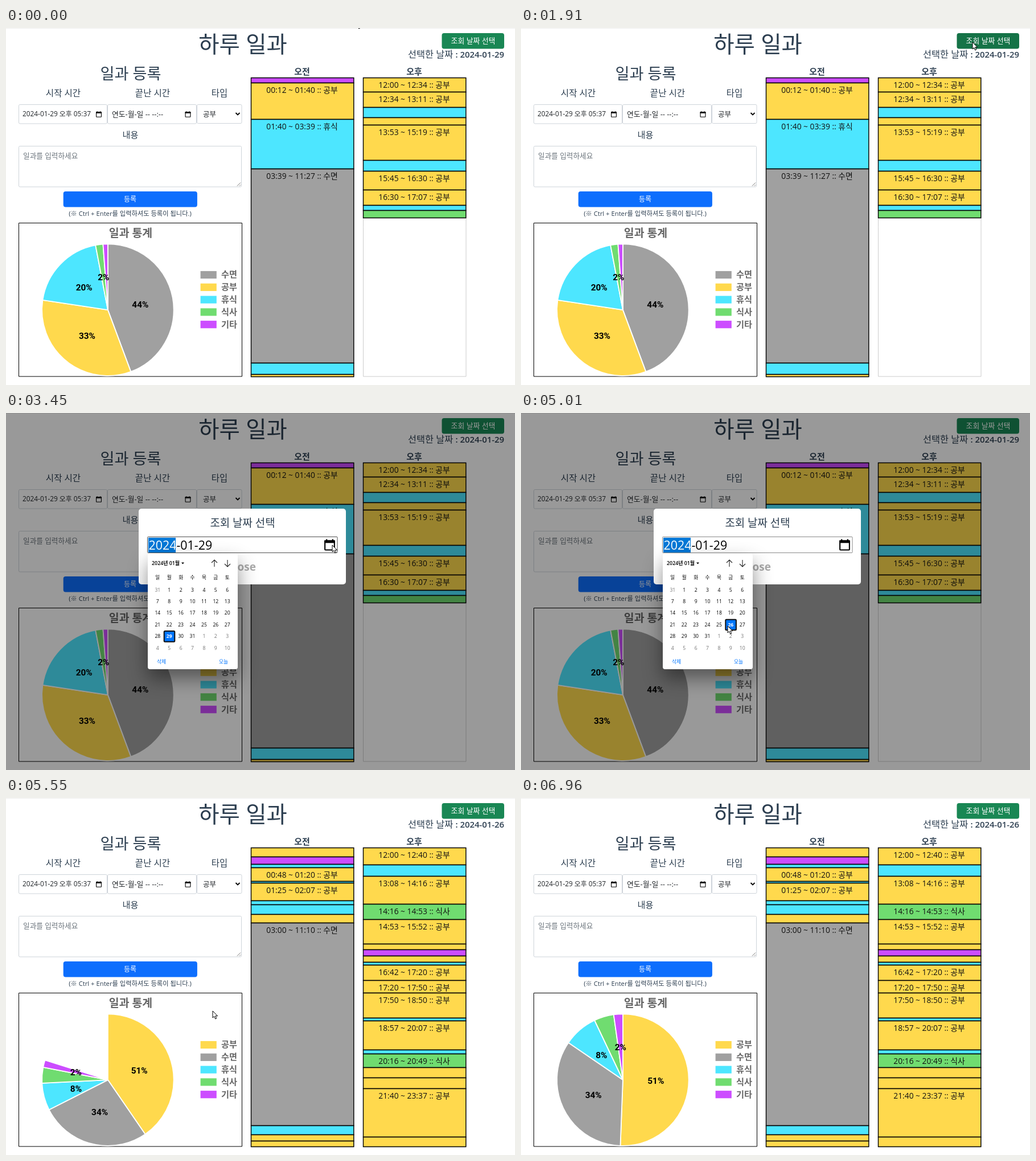
Recreate the animation shown at these times as an HTML page with a canvas. Size 894 by 627 pixels, loop 7810 ms.

```html
<!DOCTYPE html>
<html lang="ko">
<head>
<meta charset="utf-8">
<title>하루 일과</title>
<style>
html, body { margin: 0; height: 100%; overflow: hidden; background: #fff; }
canvas { display: block; }
</style>
</head>
<body>
<canvas id="stage" width="894" height="627"></canvas>
<script>
const ctx = document.getElementById('stage').getContext('2d');
const LOOP = 7810, OPEN = 1980, PICK = 3300, CHOOSE = 5010, CLOSE = 5221;
const INK = '#2c3e50', SANS = '"Open Sans", "Noto Sans CJK KR", sans-serif';
const TYPES = {
  S: ['수면', '#a0a0a0'], W: ['공부', '#ffd94d'], R: ['휴식', '#4de6ff'],
  M: ['식사', '#70dc70'], E: ['기타', '#cc4dff']
};

// Each column: type letters and the minute at which each block ends.
// Pie: slice order, end angles in degrees, and the slice without a label.
const DAYS = [{
  date: '2024-01-29',
  am: ['EWRSRW', [12, 100, 219, 687, 715, 720]],
  pm: ['WWRWWRWWRM', [34, 71, 96, 113, 199, 225, 270, 307, 319, 337]],
  pie: ['SWRME', [159.6, 278.5, 349.2, 355.8, 360], 4]
}, {
  date: '2024-01-26',
  am: ['WERWRWRRWSRWW', [22, 39, 48, 80, 85, 127, 137, 160, 180, 670, 691, 706, 720]],
  pm: ['WRWMWWEWRWWWRWRMWWWW', [40, 68, 136, 173, 232, 245, 260, 275, 282, 320, 350,
    410, 417, 487, 496, 529, 554, 580, 697, 720]],
  pie: ['WSRME', [182.2, 304.4, 334.6, 352, 360], 3]
}];

// Pointer path: time, x, y of the tip.
const PATH = [[0, 615, -13], [300, 615, -13], [850, 715, 38], [1120, 743, 31], [1510, 793, 25],
  [2230, 793, 25], [3110, 573, 232], [3600, 573, 232], [4380, 352, 391], [4610, 363, 374],
  [5960, 363, 374], [6800, 468, 612], [6960, 512, 645], [LOOP, 512, 645]];

function pointer(t) {
  const i = PATH.findIndex(p => p[0] > t), [t0, x0, y0] = PATH[i - 1], [t1, x1, y1] = PATH[i];
  const u = (t - t0) / (t1 - t0), e = u * u * (3 - 2 * u);
  return [x0 + (x1 - x0) * e, y0 + (y1 - y0) * e];
}

const inside = ([px, py], x, y, w, h) => px >= x && px < x + w && py >= y && py < y + h;

// y is the visual middle of the line.
function text(s, x, y, size, color = INK, weight = 400, align = 'center', font = SANS) {
  ctx.font = `${weight} ${size}px ${font}`;
  ctx.textAlign = align;
  ctx.fillStyle = color;
  ctx.fillText(s, x, y + size * .37);
}

function box(x, y, w, h, fill, stroke, r = 0, line = 1) {
  ctx.beginPath();
  ctx.roundRect(x, y, w, h, r);
  if (fill) { ctx.fillStyle = fill; ctx.fill(); }
  if (stroke) { ctx.strokeStyle = stroke; ctx.lineWidth = line; ctx.stroke(); }
}

function lines(width, color, ...paths) {
  ctx.lineWidth = width;
  ctx.strokeStyle = color;
  ctx.beginPath();
  for (const p of paths)
    for (let i = 0; i < p.length; i += 2) ctx[i ? 'lineTo' : 'moveTo'](p[i], p[i + 1]);
  ctx.stroke();
}

function calendarIcon(x, y, s) {
  ctx.save();
  ctx.translate(x, y);
  ctx.scale(s, s);
  box(-4.4, -3.7, 8.8, 8.4, null, '#000', .5, 1.1);
  ctx.fillStyle = '#000';
  ctx.fillRect(-4.9, -4.2, 9.8, 2.5);
  ctx.fillRect(-3.4, -5.2, 1.2, 1.5);
  ctx.fillRect(2.2, -5.2, 1.2, 1.5);
  ctx.restore();
}

function form() {
  text('하루 일과', 416, 28, 39.5, INK, 300);
  text('일과 등록', 219, 80, 27.2, INK, 300);
  text('시작 시간', 100.5, 114, 15.6, INK, 300);
  text('끝난 시간', 257.5, 114, 15.6, INK, 300);
  text('타입', 375, 114, 15.4, INK, 300);
  text('내용', 218.5, 187, 15.2, INK, 300);

  const edge = '#ced4da', dark = '#212529';
  box(22.5, 134.5, 155, 33.5, '#fff', edge, 2);
  box(178.5, 134.5, 156, 33.5, '#fff', edge, 2);
  box(335.5, 134.5, 78.5, 33, '#fff', edge, 2);
  text('2024-01-29 오후 05:37', 29, 151, 11.85, dark, 400, 'left');
  text('연도-월-일 -- --:--', 186, 151, 12.8, dark, 400, 'left');
  text('공부', 346, 151, 12.5, dark, 400, 'left');
  calendarIcon(163, 151.5, 1);
  calendarIcon(319.5, 151.5, 1);
  lines(1.8, '#000', [403.5, 149, 407, 152.5, 410.5, 149]);

  box(22.5, 207.5, 391, 71.5, '#fff', edge, 2);
  text('일과를 입력하세요', 30, 224, 12.65, '#6c757d', 400, 'left');
  lines(1, '#777', [406, 277.5, 412, 271.5], [410, 277.5, 412, 275.5]);
  box(100.7, 287, 235.2, 27.4, '#0d6efd', null, 4);
  text('등록', 218, 300.5, 12, '#fff');
  text('(※ Ctrl + Enter를 입력하셔도 등록이 됩니다.)', 218, 326, 11.25);
}

function column(x, [types, ends], hour) {
  const yOf = m => Math.round(87.4 + m * 524.4 / 720) + .5;
  const clock = m => [hour + Math.floor(m / 60), m % 60].map(n => String(n).padStart(2, '0')).join(':');
  box(x + .5, 87.5, 180.5, 524.5, null, '#ccc');
  let start = 0;
  ends.forEach((end, i) => {
    const [name, color] = TYPES[types[i]], top = yOf(start);
    box(x + .5, top, 180.3, yOf(end) - top, color, '#000', 0, 1.4);
    if (end - start >= 30)
      text(`${clock(start)} ~ ${clock(end)} :: ${name}`, x + 90, top + 12.4, 13.8, '#111');
    start = end;
  });
}

function chart([types, ends, silent], sweep) {
  const cx = 178.9, cy = 495.1, r = 115.8, rad = a => (a * sweep - 90) * Math.PI / 180;
  const startOf = i => ends[i - 1] || 0;
  box(22.5, 342.5, 392, 269.5, null, '#000');
  text('일과 통계', 219, 359.5, 19.4, '#666', 700);
  ctx.lineJoin = 'bevel';
  [...types].forEach((type, i) => {
    const [name, color] = TYPES[type], y = 433.3 + i * 21.8;
    box(341.6, y - 6.4, 28.2, 13.2, color);
    text(name, 378, y - .5, 15.2, '#666', 700, 'left');
    ctx.beginPath();
    ctx.moveTo(cx, cy);
    ctx.arc(cx, cy, r, rad(startOf(i)), rad(ends[i]));
    ctx.closePath();
    ctx.fillStyle = color;
    ctx.fill();
    ctx.strokeStyle = '#fff';
    ctx.lineWidth = 1.8;
    ctx.stroke();
  });
  ctx.lineJoin = 'miter';
  ends.forEach((end, i) => {
    if (i === silent) return;
    const mid = rad((startOf(i) + end) / 2), share = Math.round((end - startOf(i)) / 3.6);
    text(share + '%', cx + Math.cos(mid) * r / 2, cy + Math.sin(mid) * r / 2,
      15.4, '#000', 700, 'center', 'Roboto, sans-serif');
  });
}

function picker(t, tip) {
  ctx.save();
  ctx.globalAlpha = Math.min(1, (t - PICK + 70) / 220);
  ctx.shadowColor = 'rgba(0,0,0,.45)';
  ctx.shadowBlur = 34;
  ctx.shadowOffsetY = 16;
  box(249, 247, 158, 203, '#fff', null, 4);
  ctx.shadowColor = 'transparent';
  text('2024년 01월', 256, 264, 8.9, '#000', 600, 'left');
  ctx.beginPath();
  ctx.moveTo(308, 262.5);
  ctx.lineTo(313, 262.5);
  ctx.lineTo(310.5, 265.5);
  ctx.fill();
  lines(1.1, '#222', [366, 270, 366, 258], [361, 263, 366, 258, 371, 263],
    [389, 258, 389, 270], [384, 265, 389, 270, 394, 265]);

  const pitch = 20.4, chosen = t < CHOOSE ? 29 : 26;
  [...'일월화수목금토'].forEach((d, i) => text(d, 266.3 + i * pitch, 289, 8.6, '#000'));
  for (let i = 0; i < 42; i++) {
    const x = 266.3 + i % 7 * pitch, y = 310.5 + Math.floor(i / 7) * pitch;
    const other = i < 1 || i > 31, on = i === chosen;
    if (on) box(x - 9, y - 9, 18.6, 18.6, '#0075ff', '#101010', 1.5, 2);
    else if (inside(tip, x - 10.2, y - 10.2, pitch, pitch)) box(x - 10, y - 10, 20, 20, '#efefef', null, 2);
    text(other ? Math.abs(i - 31) : i, x, y, 8.6, on ? '#fff' : other ? '#757575' : '#000', on ? 700 : 400);
  }
  text('삭제', 273, 436.5, 8.8, '#0075ff');
  text('오늘', 382, 436.5, 8.8, '#0075ff');
  ctx.restore();
}

function dialog(t, tip) {
  ctx.fillStyle = 'rgba(0,0,0,.4)';
  ctx.fillRect(0, 0, 894, 627);
  box(233, 168, 364, 133, '#fff', null, 5);
  text('조회 날짜 선택', 415.5, 193, 18.9, INK, 300);
  box(248.5, 217.5, 333.5, 28, '#fff', inside(tip, 248, 217, 335, 29) ? '#4f4f4f' : '#8a8a8a', 1);
  text('2024-01-29', 250.5, 232, 21.4, '#000', 400, 'left');
  if (t >= PICK) {
    ctx.fillStyle = '#0078d7';
    ctx.fillRect(250, 219, 48, 26);
    text('2024', 250.5, 232, 21.4, '#fff', 400, 'left');
  }
  calendarIcon(568.5, 231.5, 1.9);
  text('close', 415, 270, 19, '#aaa', 700);
  if (t >= PICK) picker(t, tip);
}

function arrow([x, y]) {
  const shape = [0, 0, 0, 12, 2.8, 9.5, 4.7, 14, 6.8, 13, 4.8, 8.8, 8.6, 8.8];
  ctx.beginPath();
  for (let i = 0; i < shape.length; i += 2) ctx.lineTo(x + shape[i], y + shape[i + 1]);
  ctx.closePath();
  ctx.fillStyle = '#fff';
  ctx.fill();
  ctx.strokeStyle = '#000';
  ctx.lineWidth = 1;
  ctx.stroke();
}

function draw(t) {
  const tip = pointer(t), open = t >= OPEN && t < CLOSE, day = DAYS[t < CLOSE ? 0 : 1];
  const sweep = t < CLOSE ? 1 : 1 - (1 - Math.min(1, (t - CLOSE) / 1000)) ** 4;
  ctx.fillStyle = '#fff';
  ctx.fillRect(0, 0, 894, 627);
  ctx.fillStyle = '#eee';
  ctx.fillRect(0, 0, 894, 1);

  form();
  const hover = inside(tip, 765, 9, 110, 28) && t < 2060;
  box(765.5, 9, 109.5, 27.5, hover ? '#157347' : '#198754', null, 4);
  text('조회 날짜 선택', 820.5, 22.5, 12.9, '#fff');
  text('선택한 날짜', 706, 46, 16.3, INK, 300, 'left');
  text(': ' + day.date, 875, 46, 14.9, INK, 600, 'right');
  text('오전', 520, 76, 15, INK, 700);
  text('오후', 717, 76, 15, INK, 700);
  column(430, day.am, 0);
  column(627, day.pm, 12);
  chart(day.pie, sweep);
  if (open) dialog(t, tip);
  arrow(tip);
}

function tick() {
  draw(performance.now() % LOOP);
  requestAnimationFrame(tick);
}
tick();
</script>
</body>
</html>
```
